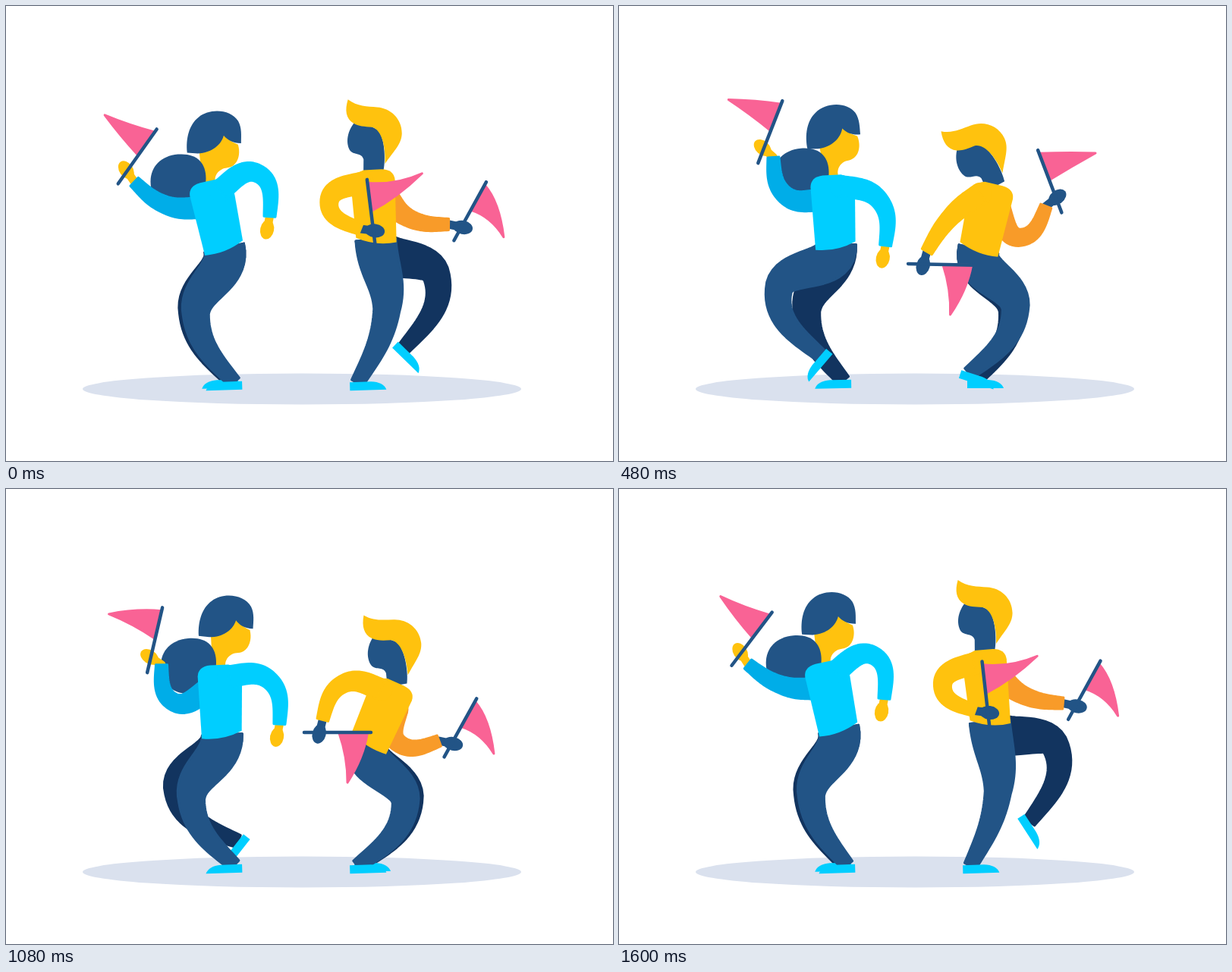
Animation of 800 by 600 pixels, one loop 1640 ms. Source, as an HTML page with a canvas:

```html
<!DOCTYPE html>
<html lang="en">
<head>
<meta charset="utf-8">
<title>Flag dance</title>
<style>
  html, body { margin: 0; width: 100%; height: 100%; overflow: hidden; background: #fff; }
  canvas { display: block; width: 800px; height: 600px; }
</style>
</head>
<body>
<canvas id="stage" width="800" height="600"></canvas>
<script>
const ctx = document.getElementById('stage').getContext('2d');
const LOOP = 1640, STEP = 40, POLE = 88;
const NAVY = '#225486', DARK = '#12345f', CYAN = '#00ceff', BLUE = '#00ade8',
      YELLOW = '#ffc20e', ORANGE = '#f89b29', PINK = '#f96395', GROUND = '#dae1ee';

const { sin, cos, PI, hypot, sqrt, min, max } = Math;
const rad = degrees => degrees * PI / 180;
const add = (p, q, k = 1) => [p[0] + q[0] * k, p[1] + q[1] * k];
const lerp = (p, q, s) => p.map((v, i) => v + (q[i] - v) * s);
const dist = (p, q) => hypot(q[0] - p[0], q[1] - p[1]);
const unit = (p, q) => { const d = dist(p, q) || 1; return [(q[0] - p[0]) / d, (q[1] - p[1]) / d]; };
const turn = ([x, y], a) => [x * cos(a) - y * sin(a), x * sin(a) + y * cos(a)];
const heading = degrees => [cos(rad(degrees)), -sin(rad(degrees))]; // counterclockwise from the right

// Periodic motion: a mean plus the first harmonics of the loop.
const swing = (mean, c1, s1, c2, s2, c3 = 0) => t => {
  const a = 2 * PI * t / LOOP;
  return mean + c1 * cos(a) + s1 * sin(a) + c2 * cos(2 * a) + s2 * sin(2 * a) + c3 * cos(3 * a);
};

// Smooth rise from start to peak and back to zero at end, wrapping around the loop.
function pulse(t, [start, peak, end]) {
  const since = (t - start + LOOP) % LOOP, rise = peak - start;
  const u = since < rise ? since / rise : max(0, (end - start - since) / (end - peak));
  return u * u * (3 - 2 * u);
}

// Hands are placed relative to the neck, pole angles are in degrees.
const woman = {
  facing: 1, skin: YELLOW, top: CYAN, backSleeve: BLUE,
  neckX: swing(278.9, -1.3, -6.5, -7.7, -5.3, -2.4),
  neckY: swing(225.7, -3.7, 1.3, 5.5, 5.1, 3.1),
  waistX: swing(287, 0, -3.4, .6, -5.2),
  waistY: swing(317, -3.3, 1.3, 2.7, 5.2, 2.6),
  tilt: swing(-4, -2.9, -.6, 3.3, 2.5, 4),
  headAt: [42, -50],
  thigh: 96, shin: 102,
  frontFoot: { rest: [301, 494, -2], raised: [255, 448, -64], step: [120, 420, 610] },
  backFoot: { rest: [296, 492, -1], raised: [317, 430, -108], step: [930, 1240, 1580] },
  front: {
    x: swing(76, 3, -1.5, 1, 4.6), y: swing(79.6, -4.5, 3.4, -18.6, .5, -9.4),
    shoulder: [12, 16], upper: 55, lower: 58
  },
  back: {
    x: swing(-97.8, -1, 3.1, -9.2, 6.4), y: swing(-2.3, -36.5, 11.9, 22.3, -12.9, 3.7),
    pole: swing(62.9, -26.3, 4.1, 11.2, 1, 6.9),
    flicks: [[320, 430, 600, 55], [1080, 1220, 1320, 22]],
    wrist: -110, tip: p => p + 110, sway: p => .17 * p - 10.5, reach: 71,
    shoulder: [-18, 32], upper: 47, lower: 51
  }
};

const man = {
  facing: -1, skin: NAVY, top: YELLOW, backSleeve: ORANGE,
  neckX: swing(494.4, .7, -4.9, -12.2, 11.9),
  neckY: swing(231.9, -2.1, -2.1, -14, 15.7),
  waistX: swing(479.7, 2.1, -4, 4.6, -3.5, 1.1),
  waistY: swing(319.9, -2.3, -3.4, -9, 8.1),
  tilt: swing(-12.2, 3.6, -5.3, 7.4, 5.5, -1.4),
  headAt: [-28, -94],
  thigh: 94, shin: 103,
  frontFoot: { rest: [463, 495, -2], raised: [453, 427, 105], step: [400, 690, 1060] },
  backFoot: { rest: [469, 492, 0], raised: [552, 428, 66], step: [1180, 1540, 1800] },
  front: {
    x: swing(-64.5, 41.9, -8.5, 21.5, -15.6, 2.4), y: swing(88, -13.1, 13.8, 6.6, -14.9, -1.2),
    pole: swing(27.1, 56.5, -6, 10.8, .3, 2.7), flicks: [],
    wrist: 76, tip: p => 1.25 * p - 115, sway: p => 4 - .09 * p, reach: 73,
    shoulder: [-14, 17], upper: 51, lower: 54
  },
  back: {
    x: swing(93.5, 10.5, -4.1, 13.3, -13.6), y: swing(51.4, 37, -27.7, -14.8, 19.8, 2.1),
    pole: swing(82.6, -24.7, 23.6, 5.8, -11.3, -2.6), flicks: [[600, 740, 880, 32]],
    wrist: 107, tip: p => 1.4 * p - 158, sway: p => 15 - .13 * p, reach: 76,
    shoulder: [16, 32], upper: 45, lower: 53
  }
};

const TORSO = new Path2D('M-27 4L-29-76Q-28-89-12-90L12-90Q28-85 29-65L26-4Q0 8-27 4Z');
const SHOE = new Path2D('M-10 1L18 1Q34 2 38 12L-10 12Z');
const BOB = new Path2D('M0 0C-11 0-18-4-23-10C-26 2-38 13-57 14L-71 13C-73-5-69-24-56-34C-42-46-14-45-4-29C1-20 0-10 0 0Z');
const BUN = new Path2D('M0-36C24-38 37-26 37-4C37 20 22 37 0 37C-22 37-36 22-36 0C-36-20-22-34 0-36Z');
const FACE = new Path2D('M-23-12C-16-3-8 0-4 2C-1 12-3 20-6 25C-12 34-19 32-24 34C-30 37-33 41-34 47L-34 58L-50 60L-55 12Z');
const QUIFF = new Path2D('M0 0C12 10 25 10 38 12C55 14 70 28 69 48C68 62 58 70 45 87C47 65 43 42 30 38C20 37 12 36 6 32C-4 25-5 14 0 0Z');
const PROFILE = new Path2D('M8 30C-5 44-5 60 0 68C5 74 15 71 17 80L16 98L42 98C46 85 47 55 38 42L20 32Z');

function place(path, color, [x, y], degrees = 0, sx = 1, sy = 1) {
  ctx.save();
  ctx.translate(x, y);
  ctx.rotate(rad(degrees));
  ctx.scale(sx, sy);
  ctx.fillStyle = color;
  ctx.fill(path);
  ctx.restore();
}

function ellipse([x, y], rx, ry, color, angle = 0) {
  ctx.fillStyle = color;
  ctx.beginPath();
  ctx.ellipse(x, y, rx, ry, angle, 0, 2 * PI);
  ctx.fill();
}

function line(p, q, width, color) {
  ctx.strokeStyle = color;
  ctx.lineWidth = width;
  ctx.beginPath();
  ctx.moveTo(...p);
  ctx.lineTo(...q);
  ctx.stroke();
}

// Elbow or knee between two joints, from the bone lengths.
function bend(p, q, a, b, side) {
  const u = unit(p, q), d = min(dist(p, q), a + b - .1);
  const along = (a * a - b * b + d * d) / (2 * d);
  const out = sqrt(max(0, a * a - along * along)) * side;
  return add(add(p, u, along), [-u[1], u[0]], out);
}

function bezier(p, q, r, s, t) {
  const a = lerp(p, q, t), b = lerp(q, r, t), c = lerp(r, s, t);
  const d = lerp(a, b, t), e = lerp(b, c, t);
  return { point: lerp(d, e, t), dir: unit(d, e) };
}

// Tapered band bending smoothly through a middle joint.
function limb(start, mid, end, [w0, w1, w2], color, startDir) {
  const through = unit(start, end), l1 = dist(start, mid), l2 = dist(mid, end);
  const curl = (p, q) => unit([0, 0], add(add([0, 0], unit(p, q), 1.5), through, -.5));
  const c1 = add(start, startDir ?? curl(start, mid), l1 * .4), c2 = add(mid, through, -l1 * .4);
  const c3 = add(mid, through, l2 * .4), c4 = add(end, curl(mid, end), -l2 * .35);
  const left = [], right = [];
  for (let i = 0; i <= 40; i++) {
    const s = i / 20;
    const { point, dir } = s <= 1 ? bezier(start, c1, c2, mid, s) : bezier(mid, c3, c4, end, s - 1);
    const width = s <= 1 ? w0 + (w1 - w0) * s * s : w1 + (w2 - w1) * (s - 1);
    const normal = [-dir[1], dir[0]], half = width / 2 - 1.5;
    left.push(add(point, normal, half));
    right.unshift(add(point, normal, -half));
  }
  ctx.beginPath();
  for (const p of [...left, ...right]) ctx.lineTo(...p);
  ctx.closePath();
  ctx.fillStyle = ctx.strokeStyle = color;
  ctx.lineWidth = 3;
  ctx.fill();
  ctx.stroke();
}

function flag(grip, angle, { tip, sway, reach }) {
  const dir = heading(angle);
  const foot = add(grip, dir, -POLE * .23), top = add(grip, dir, POLE * .77);
  const end = add(top, heading(tip(angle)), reach);
  const far = lerp(foot, top, .95), near = lerp(foot, top, .52);
  const edge = (p, k) => add(lerp(p, end, .5), dir, sway(angle) * k);
  ctx.beginPath();
  ctx.moveTo(...far);
  ctx.quadraticCurveTo(...edge(far, 2), ...end);
  ctx.quadraticCurveTo(...edge(near, 1.5), ...near);
  ctx.closePath();
  ctx.fillStyle = ctx.strokeStyle = PINK;
  ctx.lineWidth = 3;
  ctx.fill();
  ctx.stroke();
  line(foot, top, 4.5, NAVY);
}

function hand(wrist, center, color) {
  const dir = unit(wrist, center);
  line(wrist, center, 11, color);
  ellipse(add(center, dir, 2), 13, 9, color, Math.atan2(dir[1], dir[0]));
}

function drawPerson(person, t) {
  const { facing, skin, top } = person;
  const neck = [person.neckX(t), person.neckY(t)], waist = [person.waistX(t), person.waistY(t)];
  const axis = unit(neck, waist), lean = Math.atan2(-axis[0], axis[1]);
  const tilt = person.tilt(t), head = add(neck, turn(person.headAt, rad(tilt)));

  function leg({ rest, raised, step }, color) {
    const [x, y, angle] = lerp(rest, raised, pulse(t, step));
    const ankle = [x, y + 2];
    const knee = bend(waist, ankle, person.thigh, person.shin, facing);
    limb(waist, knee, ankle, [56, 37, 20], color, axis);
    place(SHOE, CYAN, [x, y], angle, -facing);
  }

  function arm(part, color) {
    const flick = (part.flicks ?? []).reduce((sum, f) => sum + f[3] * pulse(t, f), 0);
    const hold = add(neck, [part.x(t), part.y(t) - flick]);
    const angle = part.pole?.(t);
    const wrist = part.pole ? add(hold, heading(angle + part.wrist), 17) : hold;
    const shoulder = add(neck, turn(part.shoulder, lean));
    const elbow = bend(shoulder, wrist, part.upper, part.lower, -facing);
    hand(wrist, part.pole ? hold : add(wrist, [-3, 15]), skin);
    ellipse(shoulder, 15, 15, color);
    limb(shoulder, elbow, wrist, [30, 25, 18], color);
    if (part.pole) flag(hold, angle, part);
  }

  leg(person.backFoot, DARK);
  if (person === woman) {
    place(FACE, skin, head, tilt);
    place(BUN, NAVY, add(neck, [-41, 1]));
    arm(person.back, person.backSleeve);
    place(BOB, NAVY, head, tilt);
  } else {
    arm(person.back, person.backSleeve);
    place(PROFILE, skin, head, tilt);
    place(QUIFF, YELLOW, head, tilt);
  }
  leg(person.frontFoot, NAVY);
  place(TORSO, top, waist, lean * 180 / PI, facing, dist(neck, waist) / 90);
  arm(person.front, top);
}

function draw() {
  const t = Math.floor(performance.now() % LOOP / STEP) * STEP;
  ctx.fillStyle = '#fff';
  ctx.fillRect(0, 0, 800, 600);
  ctx.lineCap = ctx.lineJoin = 'round';
  ellipse([390, 505], 289, 20.5, GROUND);
  drawPerson(woman, t);
  drawPerson(man, t);
  requestAnimationFrame(draw);
}
draw();
</script>
</body>
</html>
```
